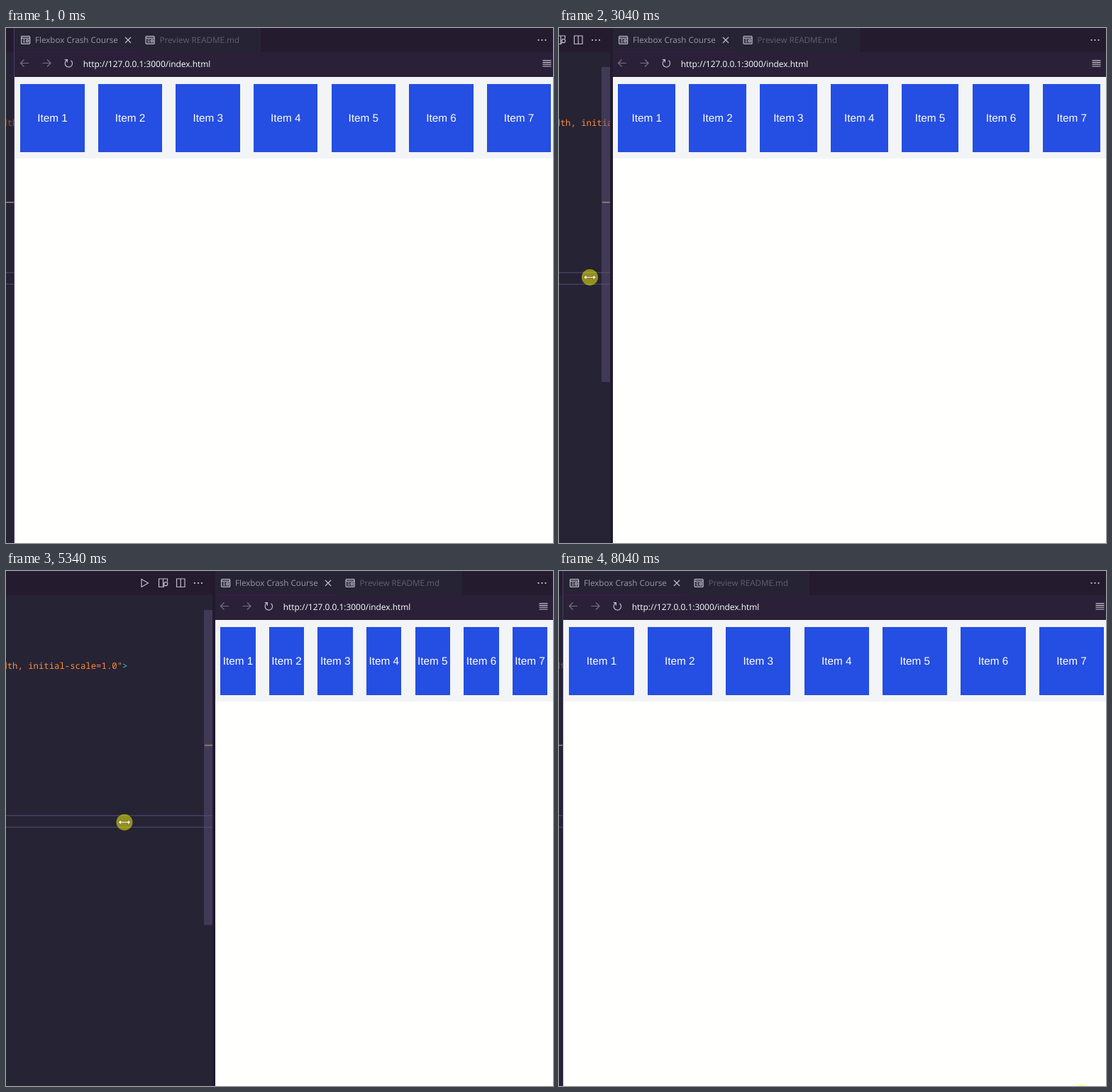
Write an HTML page that moves like this. It is 771x726 px and loops after 8070 ms.

```html
<!DOCTYPE html>
<html lang="en">
<head>
<meta charset="utf-8">
<title>Resizing a flex row</title>
<style>
  html, body { margin: 0; width: 100%; height: 100%; overflow: hidden; background: #262335; }
  svg { display: block; width: 771px; height: 726px; text-rendering: geometricPrecision; }
  rect { shape-rendering: crispEdges; }
  .ui { font-family: "Open Sans", "Noto Sans", sans-serif; font-size: 11.65px; }
  .code { font-family: "Noto Sans Mono", "DejaVu Sans Mono", monospace; font-size: 12.3px; white-space: pre; }
  .item { font-family: "Liberation Sans", Arial, sans-serif; font-size: 15.3px; fill: #fff; text-anchor: middle; }
  .icon { fill: none; stroke: #c0bdc8; stroke-width: 1.2; }
  .icon rect { shape-rendering: auto; }
  .dim { stroke: #77717f; }
</style>
</head>
<body>
<svg viewBox="0 0 771 726">
  <defs>
    <g id="page" class="icon">
      <rect x=".6" y=".6" width="12" height="10.8" rx="1"/>
      <path d="M.6 3.3H12.6M2.8 5.9H6.2M2.8 8.7H6.2"/>
      <rect x="8" y="5.6" width="2.6" height="3.2"/>
    </g>
    <g id="dots" fill="#d2cfd8">
      <circle cx="-5" r="1.1"/><circle r="1.1"/><circle cx="5" r="1.1"/>
    </g>
  </defs>

  <!-- editor -->
  <rect width="771" height="726" fill="#262335"/>
  <rect width="771" height="34" fill="#241b2f"/>
  <path d="M0 344.7H771M0 361.3H771" stroke="#463f62" stroke-width="1.6"/>
  <text id="code" class="code" x="-5.7" y="138" fill="#ff8b39">dth, initial-scale=1.0"<tspan fill="#36c9f0">&gt;</tspan></text>
  <rect id="hbar" y="715" height="11" fill="#443c5c"/>
  <g id="tools">
    <rect id="vbar" x="-16" y="55" width="14" height="444" fill="#5d5378"/>
    <path d="M-15 245.7H-2" stroke="#97806f" stroke-width="1.7"/>
    <g class="icon">
      <path d="M-104 11.5V22.5L-94.5 17Z"/>
      <path d="M-73.5 22.5H-79.5V11H-67.5V15M-73.5 11V22.5"/>
      <circle cx="-69.7" cy="18.2" r="2.5"/>
      <path d="M-71.3 20.2L-74 23.2"/>
      <path d="M-54.5 11H-43V22.5H-54.5ZM-48.8 11V22.5"/>
    </g>
    <use href="#dots" x="-24" y="17"/>
  </g>

  <!-- preview: its body reaches 2px further left while the divider is idle -->
  <g id="pane">
    <rect id="sash" x="-4" width="4" height="726" fill="#211b2d"/>
    <g id="body">
      <rect width="773" height="34" fill="#241b2f"/>
      <rect width="348" height="34" fill="#262335"/>
      <rect y="33" width="174" height="1" fill="#540c5a"/>
      <rect y="34" width="773" height="35" fill="#2a2139"/>
      <rect y="69" width="773" height="115" fill="#f3f4f6"/>
      <rect y="184" width="773" height="542" fill="#fffffe"/>
    </g>
    <rect id="border" x="-2" width="1" height="726" fill="#483d69"/>
    <use href="#page" x="8" y="11"/>
    <text class="ui" x="28" y="21.2" fill="#9a97a8">Flexbox Crash Course</text>
    <path class="icon" d="M155 13L163 21M163 13L155 21"/>
    <use href="#page" x="183.5" y="11"/>
    <text class="ui" x="203.5" y="21.2" fill="#62606e">Preview README.md</text>
    <path class="icon dim" d="M19 49.5H7.5M12.5 44.5L7.5 49.5L12.5 54.5M38.5 49.5H50M45 44.5L50 49.5L45 54.5"/>
    <path class="icon" d="M73 45.2A5.2 5.2 0 1 0 78.5 45.7M69.8 44.6H73.4V48.4"/>
    <text class="ui" x="95.8" y="55" fill="#fff" style="font-size:11.95px">http://127.0.0.1:3000/index.html</text>
  </g>
  <use href="#dots" x="755.5" y="17"/>
  <path id="menu" d="M756.5 45.9H768.5M756.5 48.6H768.5M756.5 51.3H768.5M756.5 54H768.5" stroke="#c9c6cf" stroke-width="1.1"/>
  <g id="items"></g>

  <!-- pointer -->
  <g id="cursor">
    <circle r="11.5" fill="#ff0" fill-opacity=".5"/>
    <path id="resize" d="M-9 0L-4.5 -3.8V-1.1H4.5V-3.8L9 0L4.5 3.8V1.1H-4.5V3.8Z" fill="#fff" fill-opacity=".85" stroke="#75692a" stroke-width=".8"/>
    <path id="arrow" d="M0 0V14.5L3.4 11.4L5.8 16.6L7.9 15.7L5.6 10.6H10.2Z" fill="#fff" stroke="#222" stroke-width=".8"/>
  </g>
</svg>
<script>
const LOOP = 8070, STEP = 10;
const COUNT = 7, GAP = 19.14, MIN_LEFT = 7;
const FOLLOW = 65;            // the divider trails the pointer by this long
const GRAB = 1420, LEAVE = 6940;
const $ = id => document.getElementById(id);
const clamp = (v, lo = 0, hi = 1) => Math.min(hi, Math.max(lo, v));

// pointer moves; a skew above 1 starts slower, below 1 faster
const home = { x: 736, y: 738 };
const moves = [
  { at: 150, span: 280, x: 13, y: 351 },
  { at: 1431, span: 870, x: 270, y: 351 },
  { at: 2300, span: 784, x: 36, y: 351.5, skew: 2.1 },
  { at: 4040, span: 750, x: 322, y: 345, skew: .64 },
  { at: 4907, span: 482, x: 35, y: 362, skew: 6 },
  { at: 5700, span: 720, x: 4.5, y: 361 },
  { at: LEAVE, span: 750, x: 713, y: 738 },
  { at: 7990, span: 10, x: 736.5, y: 735.5 }
];

function pointer(t) {
  let { x, y } = home;
  for (const m of moves) {
    const s = clamp((t - m.at) / m.span) ** (m.skew || 1);
    const k = (1 - Math.cos(Math.PI * s)) / 2;
    x += (m.x - x) * k;
    y += (m.y - y) * k;
  }
  return { x, y };
}

const divider = t => Math.max(MIN_LEFT, pointer(clamp(t - FOLLOW, 430, LEAVE)).x);

function add(tag, attrs) {
  const el = document.createElementNS($("items").namespaceURI, tag);
  for (const k in attrs) el.setAttribute(k, attrs[k]);
  return $("items").appendChild(el);
}
const items = Array.from({ length: COUNT }, (_, i) => {
  const box = add("rect", { y: 79, height: 96, fill: "#254ee2" });
  const label = add("text", { y: 132, class: "item" });
  label.textContent = "Item " + (i + 1);
  return { box, label };
});

const show = (id, on) => $(id).setAttribute("visibility", on ? "visible" : "hidden");
const move = (id, x, y = 0) => $(id).setAttribute("transform", `translate(${x} ${y})`);

function barOpacity(t) {
  if (t < GRAB) return clamp((t - 190) / 120) * clamp((1250 - t) / 400);
  return clamp((LEAVE + 460 - t) / 400);
}

function draw(t) {
  const exact = divider(t), left = Math.round(exact);
  const active = t >= GRAB && t < LEAVE;
  move("tools", left);
  move("pane", left);
  move("body", active ? 0 : -2);
  show("sash", active);
  show("border", !active);
  $("code").setAttribute("opacity", active ? 1 : .5);
  $("vbar").setAttribute("opacity", .5 * barOpacity(t));
  show("hbar", t > 4100 && t < 4480);
  $("hbar").setAttribute("width", Math.max(0, left - 32));

  // page width trails behind while the pane grows
  const lag = clamp(divider(t - STEP) - exact, 0, 5);
  move("menu", -lag);
  const start = left + 7.3;
  const width = (768.2 - lag - start - GAP * (COUNT - 1)) / COUNT;
  items.forEach(({ box, label }, i) => {
    const x = start + i * (width + GAP);
    box.setAttribute("x", x);
    box.setAttribute("width", width);
    label.setAttribute("x", x + width / 2);
  });

  const { x, y } = pointer(t);
  const resizing = t >= 400 && t < LEAVE;
  move("cursor", x, y);
  show("resize", resizing);
  show("arrow", !resizing);
}

const begin = performance.now();
function tick() {
  const t = (performance.now() - begin) % LOOP;
  draw(Math.floor(t / STEP) * STEP);
  requestAnimationFrame(tick);
}
draw(0);
requestAnimationFrame(tick);
</script>
</body>
</html>
```
